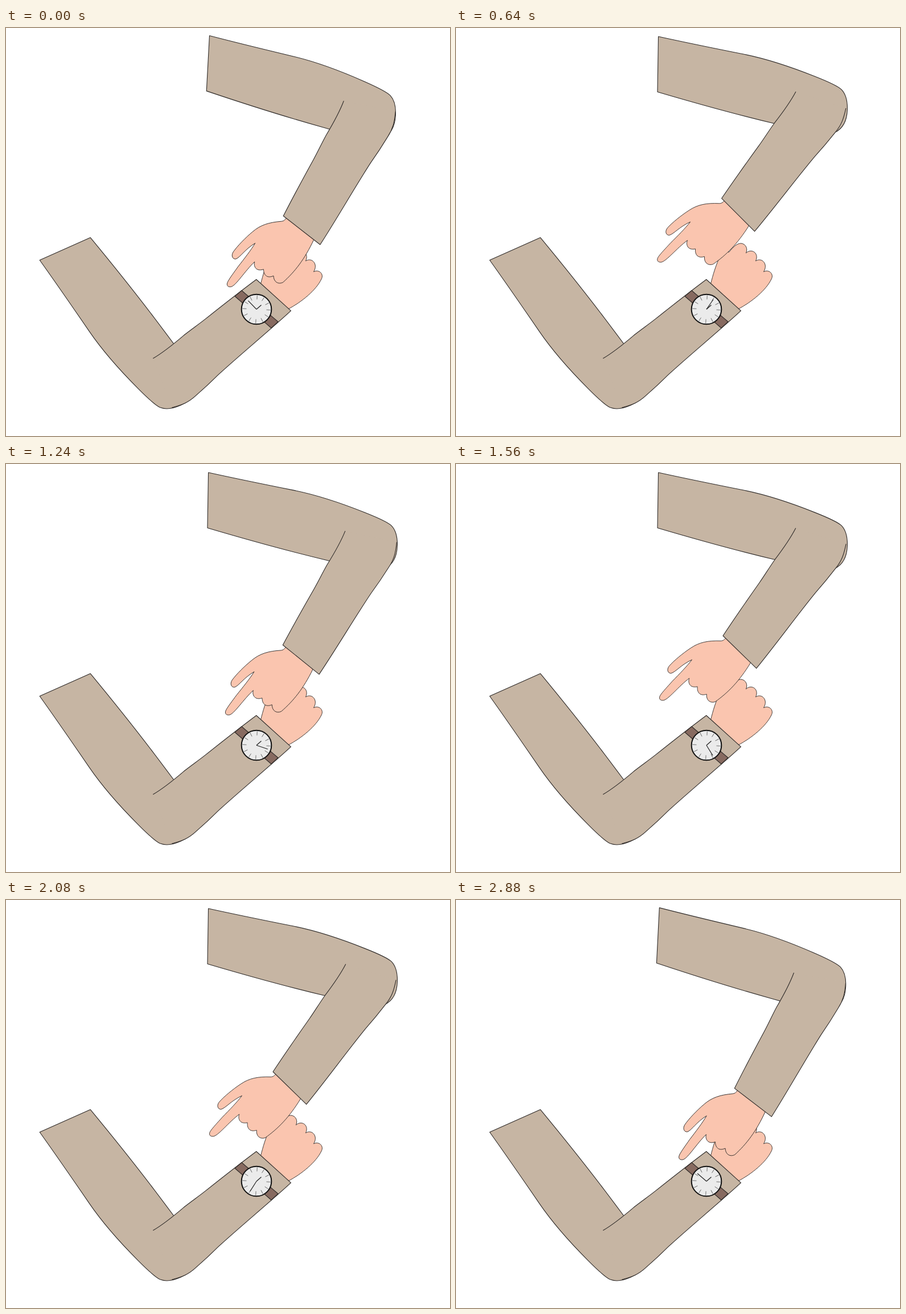
Animation, 780 px wide and 718 px high, one loop 2920 ms. Source, as an HTML page:

```html
<!DOCTYPE html>
<html lang="en">
<head>
<meta charset="utf-8">
<title>Tapping the watch</title>
<style>
  html, body { margin: 0; width: 100%; height: 100%; overflow: hidden; background: #fff; }
  svg { display: block; width: 780px; height: 718px; }
  path { stroke: #2f2b29; stroke-width: 1.1; stroke-linejoin: round; }
  .sleeve { fill: #c6b5a3; }
  .skin { fill: #fac5af; stroke-width: .9; }
  .strap { fill: #876a60; }
  .dial { fill: #ebebeb; stroke: #111; stroke-width: 2; }
  .tick { stroke: #555; stroke-width: .8; }
  .hand { stroke: #222; stroke-width: 1.2; }
</style>
</head>
<body>
<svg viewBox="0 0 780 718">
  <defs>
    <path id="upper" class="sleeve" d="M600,178 L559,168 C490,151.5 420,132 354,112.5
      L355.5,15 C410,27 470,39 505,46 S580,65 630,85 Q668,100 677,108
      Q688,119 687.5,143 C687,163 680,177 665,184 L656,188"/>
    <path id="fore" class="sleeve" d="M597,112 C587,131 573,150 559,168
      C549,182 541,195 532,207.5 C510,238 488,269 467,300 L525,358
      C560,316 598,265 630.5,226 C645,210 655,198 666,184 C677,171 681,160 685,141"/>
  </defs>

  <!-- arm with the watch -->
  <path class="skin" d="M447,452 C452,432 456,420 461,408 C466,399 473,395 480,394
    C488,384 494,379 501,379 C509,380 513,388 509.5,396
    C519,387 533,396 526.5,410 C537,403 549,415 540.5,429
    C550,424 559,433 554,442 C545,461 520,482 495,495 L470,480 Z"/>
  <g transform="matrix(.392 .92 .92 -.392 -93.96 87.28)">
    <use href="#upper"/>
  </g>
  <g transform="matrix(.392 .92 .92 -.392 -95.96 84.78) rotate(-20.3 650 125)">
    <use href="#fore"/>
  </g>
  <path class="strap" d="M402,472 L414,462 L478,517 L466,528 Z"/>
  <g id="watch" transform="translate(440 495)">
    <circle class="dial" r="26.3"/>
    <path class="hand" d="M0,0 L8.5,-7.5"/>
    <path class="hand" id="minute" d="M0,0 V-21"/>
  </g>

  <!-- tapping arm -->
  <g id="arm">
    <use href="#upper"/>
    <g id="elbow">
      <path class="skin" d="M473,302 C470,307 467,309 463,309 C440,308 425,311 410,321
        C396,330 380,343 372,352 C367,358 369,365 375,365 C383,363 393,350 412,341.5
        C403,353 390,366 377,379 C368,389 361,396 356,403 C352,409 355,413 361,412.5
        C370,411 388,388 407,374 C404,381 407,392 421,389 C420,400 426,406 437,402.5
        C436,413 443,419 452,416 C475,400 495,380 515,348 L490,318 Z"/>
      <use href="#fore"/>
    </g>
  </g>
</svg>
<script>
  const LOOP = 2920, STEP = 40, BEAT = 364;
  // one pose per beat: [shoulder, elbow] in degrees
  const REST = [2.2, -9.2], DOWN = [.1, -13.2], UP = [0, 4.3];
  const poses = [REST, DOWN, UP, DOWN, UP, DOWN, UP, DOWN, REST, REST];

  const byId = id => document.getElementById(id);
  const turn = (node, angle, x, y) =>
    node.setAttribute('transform', `rotate(${angle.toFixed(3)} ${x} ${y})`);

  const watch = byId('watch'), minute = byId('minute');
  const arm = byId('arm'), elbow = byId('elbow');

  for (let i = 0; i < 12; i++) {
    const tick = document.createElementNS('http://www.w3.org/2000/svg', 'path');
    tick.setAttribute('class', 'tick');
    tick.setAttribute('d', 'M0,-17.5 V-24.5');
    turn(tick, i * 30 + 3, 0, 0);
    watch.insertBefore(tick, watch.children[1]);
  }

  function draw(t) {
    const p = t / BEAT;
    const i = Math.floor(p), k = p - i;
    const [shoulder, bend] = poses[i].map((a, n) => a + (poses[i + 1][n] - a) * k);
    turn(arm, shoulder, 395, 66);
    turn(elbow, bend, 650, 125);
    turn(minute, t / LOOP * 360 - 44, 0, 0);
  }

  const start = performance.now();
  function play() {
    const t = Math.max(0, performance.now() - start) % LOOP;
    draw(Math.floor(t / STEP) * STEP);
    requestAnimationFrame(play);
  }
  play();
</script>
</body>
</html>
```
